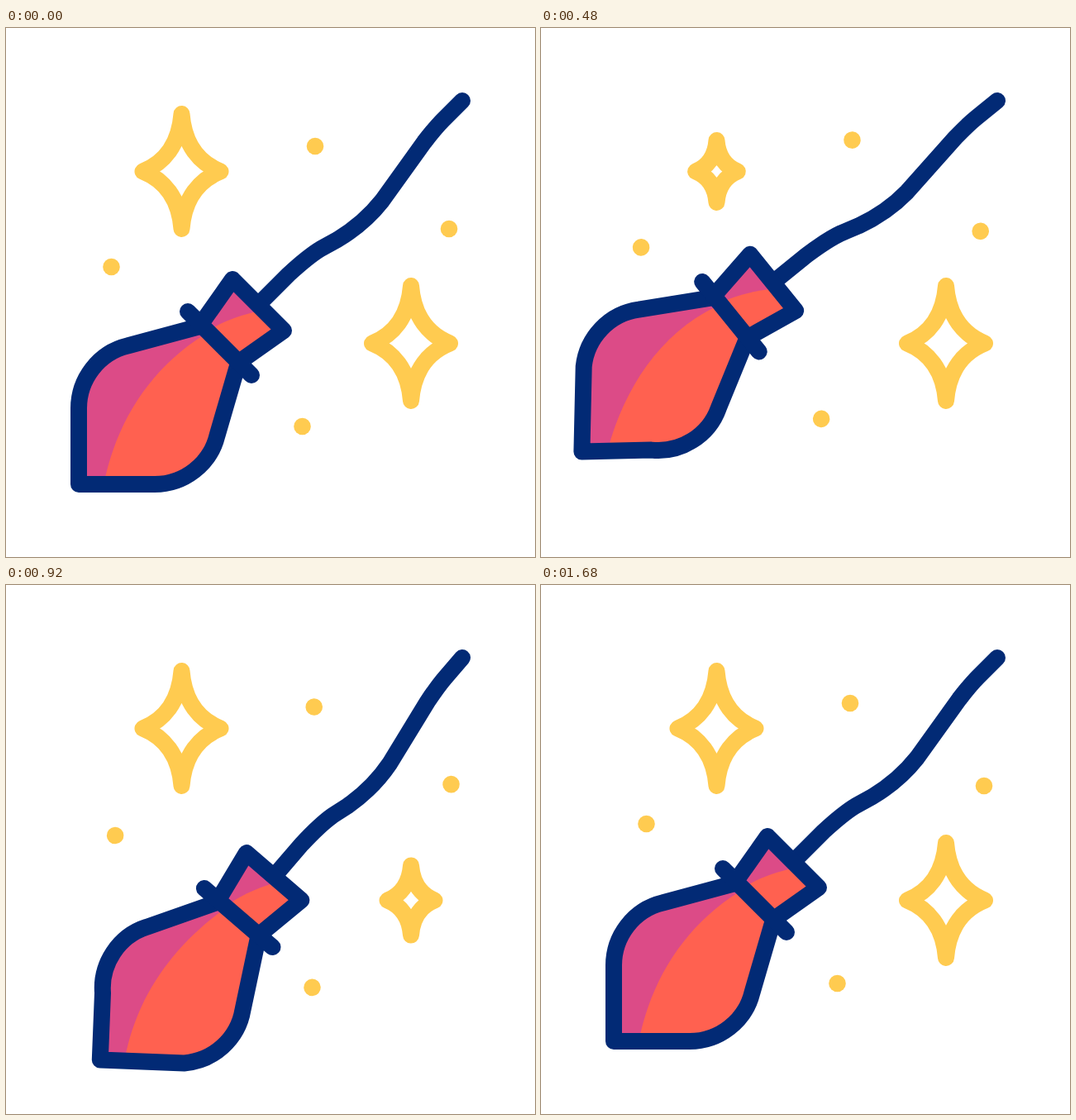
An HTML page that plays this animation: 640x640 px, repeating every 2.24 s.

```html
<!DOCTYPE html>
<html lang="en">
<head>
<meta charset="utf-8">
<title>Sweeping broom</title>
<style>
  html, body { margin: 0; overflow: hidden; background: #fff; }
  svg { display: block; }
  .line { stroke-width: 20; stroke-linecap: round; stroke-linejoin: round; fill: none; }
  .navy { stroke: #022a75; }
  .star { stroke: #ffcb50; vector-effect: non-scaling-stroke; }
  .pink { fill: #dc4b87; }
  .red { fill: #ff6150; }
</style>
</head>
<body>
<svg width="640" height="640" viewBox="0 0 640 640">
  <defs>
    <path id="spark" class="line star" d="M0-69.5C3-32 22-10 47 0C22 10 3 32 0 69.5C-3 32-22 10-47 0C-22-10-3-32 0-69.5Z"/>
  </defs>
  <use id="star1" href="#spark"/>
  <use id="star2" href="#spark"/>
  <g id="dots" fill="#ffcb50">
    <circle cx="374" cy="143" r="10.3"/>
    <circle cx="536" cy="243" r="10.3"/>
    <circle cx="127.5" cy="289" r="10.3"/>
    <circle cx="358.5" cy="482" r="10.3"/>
  </g>
  <g id="broom">
    <path class="line navy" d="M310 330L342 298C354 287 366 276 381 267L401 256C421 244 440 228 455 209L506 138C513 129 520 120 529 111L552 88"/>
    <path class="pink" d="M238 355L274 304L336 366L285 402Z"/>
    <path class="red" d="M240 369C258 357 280 348 308 342L336 366L285 402Z"/>
    <path id="fill" class="pink"/>
    <path id="shade" class="red"/>
    <path id="outline" class="line navy"/>
    <path class="line navy" d="M238 355L274 304L336 366L285 402M220 343L297 420"/>
  </g>
</svg>
<script>
const LOOP = 2240;
const $ = id => document.getElementById(id);
const transform = (id, value) => $(id).setAttribute('transform', value);

// Progress from a to b, and its symmetric ease-in-out
const progress = (t, a, b) => Math.min(1, Math.max(0, (t - a) / (b - a)));
function ease(t, a, b) {
  const u = progress(t, a, b), rise = u ** 1.8;
  return rise / (rise + (1 - u) ** 1.8);
}

// Rest, +1 at high, -1 at low, rest again
const wave = (t, start, high, low, end) =>
  ease(t, start, high) - 2 * ease(t, high, low) + ease(t, low, end);

const lobe = (t, a, b) => Math.sin(Math.PI * progress(t, a, b));
const twinkle = (t, middle) => 1 - 0.64 * ease(320 - Math.abs(t - middle), 0, 320);

function draw(now) {
  const t = now % LOOP;
  transform('star1', `translate(212.5 173.5) scale(${twinkle(t, 600)})`);
  transform('star2', `translate(490 381.5) scale(${twinkle(t, 1060)})`);
  transform('dots', `rotate(${4 * wave(t, 40, 590, 1085, 1680)} 490 178)`);
  transform('broom', `rotate(${6.1 * wave(t, 20, 530, 1070, 1640)} 552 88)`);

  // The bristle tip trails behind the swing
  const bend = 18.5 * (lobe(t, 40, 640) - lobe(t, 640, 1040) + lobe(t, 1040, 1680));
  const dx = bend * 0.62, dy = bend * 0.78;
  const lowerEdge = 'L180 552C215 552 247 528 255.5 493L282 402';
  const body = `M238 360L147 384.5C112 393 88 425 88 460L${88 + dx} ${552 + dy}${lowerEdge}`;
  $('fill').setAttribute('d', body);
  $('outline').setAttribute('d', body);
  $('shade').setAttribute('d',
    `M240 371C173 413 ${133 + dx * 0.6} ${478 + dy * 0.6} ${118 + dx} ${553 + dy}${lowerEdge}Z`);
  requestAnimationFrame(draw);
}
requestAnimationFrame(draw);
</script>
</body>
</html>
```
